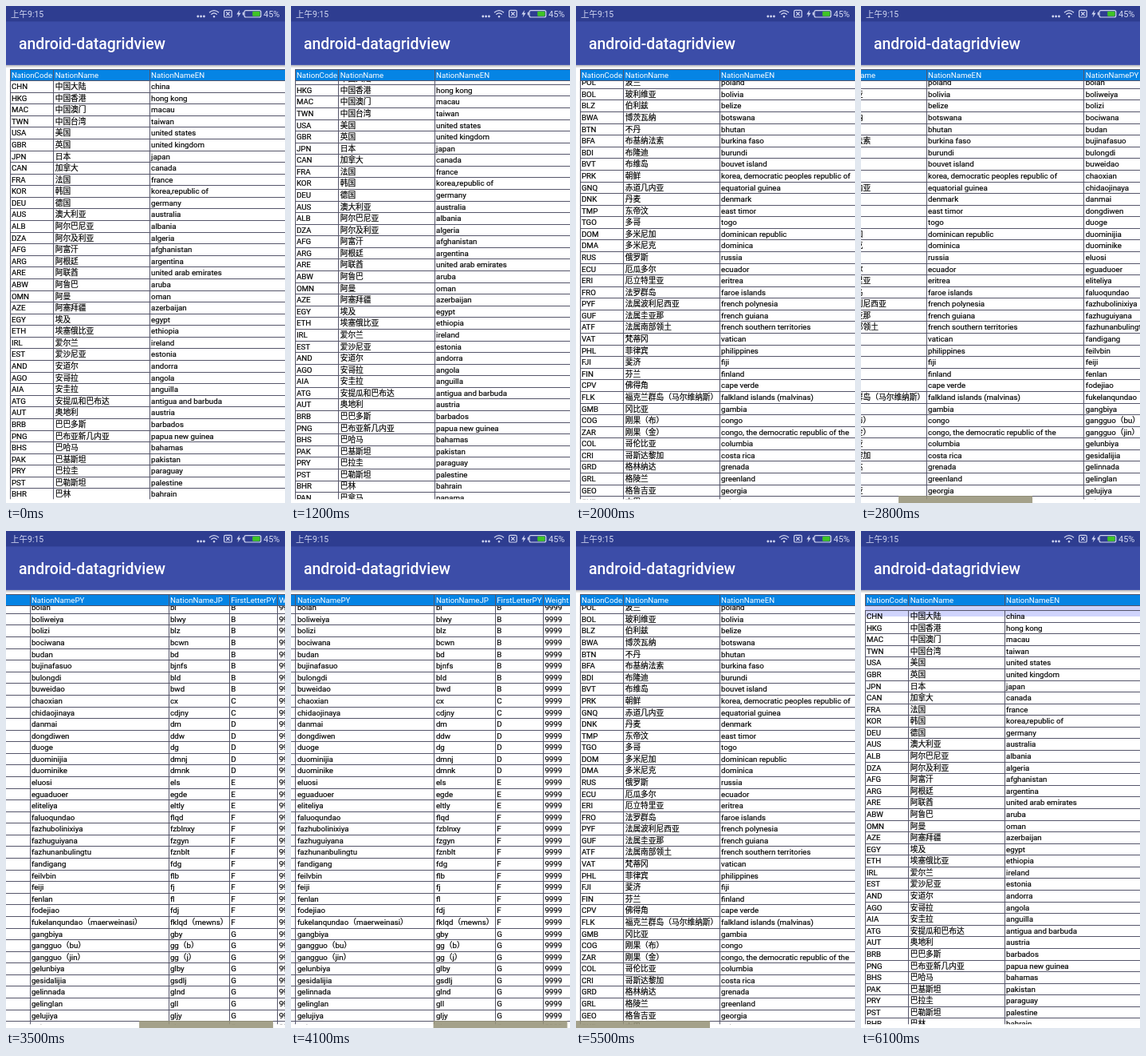
These frames come from a looping animation (350 by 622 pixels, 6.2 s). An HTML page:

```html
<!DOCTYPE html>
<html lang="zh-CN">
<head>
<meta charset="utf-8">
<title>android-datagridview</title>
<style>
  html, body { margin: 0; width: 100%; height: 100%; overflow: hidden; background: #fff; }
  svg { display: block; width: 350px; height: 622px; }
  text { font-family: Roboto, "Noto Sans CJK SC", "Noto Sans CJK", sans-serif; font-size: 9.72px; white-space: pre; }
  #rows text { fill: #000; stroke: #000; stroke-width: .18; }
  #head text { fill: #fff; }
  .grid { stroke: #55556a; stroke-width: 1; fill: none; shape-rendering: crispEdges; }
</style>
</head>
<body>
<svg id="stage" viewBox="0 0 350 622">
  <defs>
    <clipPath id="body"><rect y="93.4" width="350" height="523.8"/></clipPath>
    <linearGradient id="shade" x2="0" y2="1">
      <stop offset="0" stop-color="#000" stop-opacity=".28"/>
      <stop offset="1" stop-color="#000" stop-opacity="0"/>
    </linearGradient>
  </defs>
  <rect width="350" height="622" fill="#fff"/>
  <rect id="glow" x="5" y="93.5" width="345" height="13.5" fill="#98a0f8" opacity=".45"/>
  <g clip-path="url(#body)"><g id="rows"></g></g>
  <g id="head"></g>
  <rect id="thumb" y="613" width="168" height="9" fill="#98957a" fill-opacity=".88"/>

  <rect y="73.9" width="350" height="4" fill="url(#shade)"/>
  <rect width="350" height="73.9" fill="#3c4da8"/>
  <rect width="350" height="19.4" fill="#2e3d90"/>
  <text x="16" y="54" fill="#fff" style="font-size:19.44px;font-weight:500">android-datagridview</text>

  <g fill="#d3d8f2">
    <text x="6" y="13.8" style="font-size:10.5px">上午9:15</text>
    <text x="323" y="13.8" style="font-size:11px">45%</text>
    <circle cx="240.8" cy="13" r="1.4"/><circle cx="244.6" cy="13" r="1.4"/><circle cx="248.4" cy="13" r="1.4"/>
    <circle cx="261" cy="13.2" r="1.2"/>
    <path d="M293 5 L289.3 10.4 H291.7 L290.6 14.6 L294.6 8.8 H292.2 Z"/>
    <rect x="296.8" y="7.8" width="1.6" height="3.8" rx=".6"/>
  </g>
  <g fill="none" stroke="#d3d8f2" stroke-width="1.2">
    <path d="M255 8.2 Q261 3 267 8.2 M257.2 10.6 Q261 7.2 264.8 10.6"/>
    <rect x="273.6" y="5.4" width="9.6" height="8.6" rx="1.6"/>
    <path d="M276.2 7.5 L280.6 11.9 M280.6 7.5 L276.2 11.9"/>
    <rect x="299" y="5.6" width="20.8" height="8.4" rx="2"/>
  </g>
  <rect x="309.2" y="6.8" width="9.4" height="6" rx="1" fill="#3fc425"/>
</svg>
<script>
const NS = 'http://www.w3.org/2000/svg';
const $ = id => document.getElementById(id);
const TOP = 93.6, PITCH = 14.58, CONTENT = 729, LOOP = 6200;
const EDGES = [5, 59.8, 180.2, 378, 552, 628.3, 688.5, 724];
const TITLES = 'NationCode NationName NationNameEN NationNamePY NationNameJP FirstLetterPY Weight'.split(' ');

// code|name|English|pinyin syllables
const DATA = `CHN|中国大陆|china
HKG|中国香港|hong kong
MAC|中国澳门|macau
TWN|中国台湾|taiwan
USA|美国|united states
GBR|英国|united kingdom
JPN|日本|japan
CAN|加拿大|canada
FRA|法国|france
KOR|韩国|korea,republic of
DEU|德国|germany
AUS|澳大利亚|australia
ALB|阿尔巴尼亚|albania
DZA|阿尔及利亚|algeria
AFG|阿富汗|afghanistan
ARG|阿根廷|argentina
ARE|阿联酋|united arab emirates
ABW|阿鲁巴|aruba
OMN|阿曼|oman
AZE|阿塞拜疆|azerbaijan
EGY|埃及|egypt
ETH|埃塞俄比亚|ethiopia
IRL|爱尔兰|ireland
EST|爱沙尼亚|estonia
AND|安道尔|andorra
AGO|安哥拉|angola
AIA|安圭拉|anguilla
ATG|安提瓜和巴布达|antigua and barbuda
AUT|奥地利|austria
BRB|巴巴多斯|barbados
PNG|巴布亚新几内亚|papua new guinea
BHS|巴哈马|bahamas
PAK|巴基斯坦|pakistan
PRY|巴拉圭|paraguay
PST|巴勒斯坦|palestine
BHR|巴林|bahrain
PAN|巴拿马|panama
BRA|巴西|brazil
BLR|白俄罗斯|belarus
BMU|百慕大|bermuda
BGR|保加利亚|bulgaria
MNP|北马里亚纳群岛|northern mariana islands
BEN|贝宁|benin
BEL|比利时|belgium
ISL|冰岛|iceland
PRI|波多黎各|puerto rico
POL|波兰|poland|bo lan
BOL|玻利维亚|bolivia|bo li wei ya
BLZ|伯利兹|belize|bo li zi
BWA|博茨瓦纳|botswana|bo ci wa na
BTN|不丹|bhutan|bu dan
BFA|布基纳法索|burkina faso|bu ji na fa suo
BDI|布隆迪|burundi|bu long di
BVT|布维岛|bouvet island|bu wei dao
PRK|朝鲜|korea, democratic peoples republic of|chao xian
GNQ|赤道几内亚|equatorial guinea|chi dao ji na ya
DNK|丹麦|denmark|dan mai
TMP|东帝汶|east timor|dong di wen
TGO|多哥|togo|duo ge
DOM|多米尼加|dominican republic|duo mi ni jia
DMA|多米尼克|dominica|duo mi ni ke
RUS|俄罗斯|russia|e luo si
ECU|厄瓜多尔|ecuador|e gua duo er
ERI|厄立特里亚|eritrea|e li te li ya
FRO|法罗群岛|faroe islands|fa luo qun dao
PYF|法属波利尼西亚|french polynesia|fa zhu bo li ni xi ya
GUF|法属圭亚那|french guiana|fa zhu gui ya na
ATF|法属南部领土|french southern territories|fa zhu nan bu ling tu
VAT|梵蒂冈|vatican|fan di gang
PHL|菲律宾|philippines|fei lv bin
FJI|斐济|fiji|fei ji
FIN|芬兰|finland|fen lan
CPV|佛得角|cape verde|fo de jiao
FLK|福克兰群岛（马尔维纳斯）|falkland islands (malvinas)|fu ke lan qun dao （ ma er wei na si ）
GMB|冈比亚|gambia|gang bi ya
COG|刚果（布）|congo|gang guo （ bu ）
ZAR|刚果（金）|congo, the democratic republic of the|gang guo （ jin ）
COL|哥伦比亚|columbia|ge lun bi ya
CRI|哥斯达黎加|costa rica|ge si da li jia
GRD|格林纳达|grenada|ge lin na da
GRL|格陵兰|greenland|ge ling lan
GEO|格鲁吉亚|georgia|ge lu ji ya
CUB|古巴|cuba|gu ba`.split('\n').map(line => {
  const [code, name, en, py = ''] = line.split('|');
  const parts = py.split(' ');
  const initials = parts.map(p => p.charAt(0)).join('');
  return [code, name, en, parts.join(''), initials, initials.charAt(0).toUpperCase(), '9999'];
});

function add(parent, tag, attrs, content) {
  const el = document.createElementNS(NS, tag);
  for (const k in attrs) el.setAttribute(k, attrs[k]);
  if (content) el.textContent = content;
  parent.appendChild(el);
}

function addRow(parent, cells, y) {
  cells.forEach((s, i) => s && add(parent, 'text', { x: EDGES[i] + 1.9, y }, s));
}

function addGrid(parent, top, count) {
  const bottom = top + count * PITCH;
  let d = EDGES.map(x => `M${x} ${top}V${bottom}`).join('');
  for (let i = 0; i <= count; i++) d += `M5 ${top + i * PITCH}H724`;
  add(parent, 'path', { d, class: 'grid' });
}

const rows = $('rows'), head = $('head');
addGrid(rows, TOP, DATA.length);
DATA.forEach((cells, i) => addRow(rows, cells, TOP + i * PITCH + 10.5));
add(head, 'rect', { x: 5, y: TOP - PITCH, width: 719, height: PITCH, fill: '#0584e4' });
addGrid(head, TOP - PITCH, 1);
addRow(head, TITLES, TOP - 4.1);

// Smooth progress from 0 to 1 between two times
function ease(t, from, to) {
  const u = Math.min(1, Math.max(0, (t - from) / (to - from)));
  return u * u * (3 - 2 * u);
}

function draw(t) {
  const sy = 675.5 * ease(t, 1142, 1952) - 681.5 * ease(t, 5550, 6100);
  const sx = 348 * ease(t, 2450, 3450) + 31 * ease(t, 3650, 4300) - 379 * ease(t, 4595, 5400);
  rows.setAttribute('transform', `translate(${-sx} ${-sy})`);
  head.setAttribute('transform', `translate(${-sx} 0)`);
  $('glow').style.display = sy < -1 ? '' : 'none';
  $('thumb').setAttribute('x', sx * 350 / CONTENT);
  $('thumb').setAttribute('opacity', t < 2500 ? 0 : 1 - ease(t, 5650, 5900));
}

const start = performance.now();
function tick() {
  const t = (performance.now() - start) % LOOP;
  draw(Math.floor(t / 100) * 100);
  requestAnimationFrame(tick);
}
tick();
</script>
</body>
</html>
```
